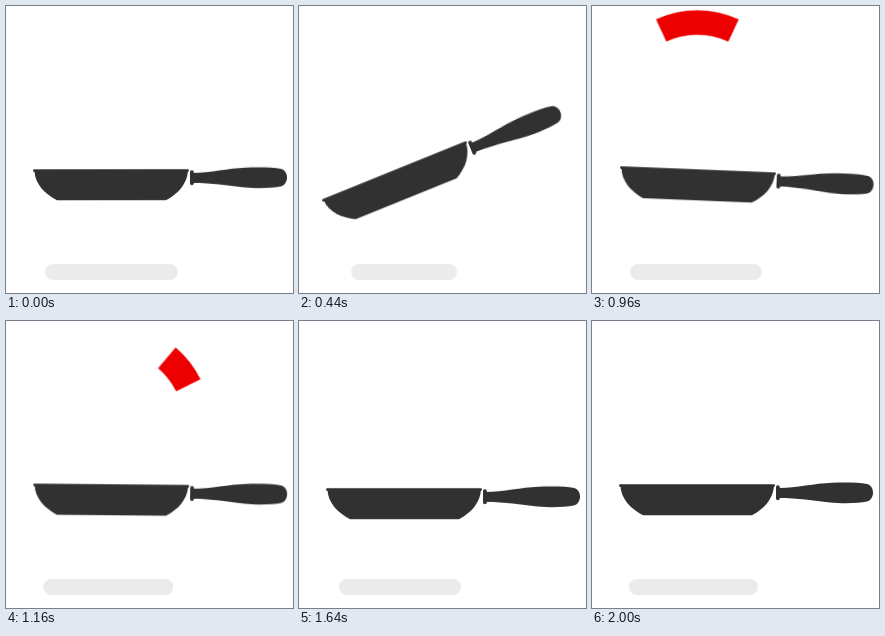
Write an HTML page that moves like this. It is 287x287 px and loops after 2.28 s.

```html
<!DOCTYPE html>
<html lang="en">
<head>
<meta charset="utf-8">
<title>Frying pan loader</title>
<style>
  html, body { margin: 0; width: 100%; height: 100%; overflow: hidden; background: #fff; }
  svg { display: block; width: 100%; height: 100%; }

  .pan, .toss, .shadow { animation: 2280ms linear infinite; }

  .pan {
    fill: #313131;
    transform-origin: 102.5px 189.3px;
    animation-name: swing;
  }
  .toss {
    fill: none;
    stroke: #ed0000;
    transform-origin: 105.3px 102.5px;
    animation-name: toss;
  }
  .shadow { fill: #ebebeb; animation-name: shadow; }

  /* tilt back, flick, settle, then dip under the landing */
  @keyframes swing {
    0%     { transform: translateY(0) rotate(0deg); }
    21.93% { transform: translateY(0) rotate(-25deg); }
    26.32% { transform: translateY(0) rotate(7deg); }
    48.25% { transform: translateY(0) rotate(.5deg); }
    51.75% { transform: translateY(0) rotate(.5deg); }
    55.26% { transform: translateY(6px) rotate(.4deg); }
    59.65% { transform: translateY(5.3px) rotate(.4deg); }
    71.93% { transform: translateY(3.9px) rotate(0deg); }
    87.72%, 100% { transform: translateY(0) rotate(0deg); }
  }

  /* rotation places the tail; the dash is the visible length in degrees */
  @keyframes toss {
    0%, 21.93% {
      transform: rotate(-232deg); stroke-dasharray: 0 360; stroke-width: 13px;
      animation-timing-function: ease-in;
    }
    26.32% { transform: rotate(-220deg); stroke-dasharray: 103 360; stroke-width: 15.5px; }
    48.25% {
      transform: rotate(-74.3deg); stroke-dasharray: 29.2 360; stroke-width: 28px;
      animation-timing-function: ease-in;
    }
    55.26%, 100% { transform: rotate(50deg); stroke-dasharray: 0 360; stroke-width: 24px; }
  }

  @keyframes shadow {
    0%     { x: 39px; width: 133px; }
    21.93% { x: 54px; width: 102px; }
    26.32% { x: 39px; width: 132px; }
    42.11% { x: 38px; width: 132px; }
    55.26%, 59.65% { x: 37px; width: 129px; }
    71.93% { x: 40px; width: 122px; }
    87.72%, 100% { x: 37px; width: 129px; }
  }
</style>
</head>
<body>
<svg viewBox="0 0 287 287">
  <rect class="shadow" x="39" y="258" width="133" height="16" rx="8"/>
  <circle class="toss" cx="105.3" cy="102.5" r="86" pathLength="360" stroke-dasharray="0 360"/>
  <g class="pan">
    <rect x="27" y="163.3" width="156" height="2.6" rx="1.3"/>
    <path d="M28.5 165C29 178 39 188 51 194.2H160C172 188 181 178 182 165Z"/>
    <rect x="184" y="164.2" width="3.8" height="15" rx="1.9"/>
    <path d="M187 167C205 167 222 162.4 240 161.8C254 161.2 267 161.6 275 163C283 165 283 178 275 180.6C266 182.4 250 182.6 238 181.4C221 179.6 206 177 187 177Z"/>
  </g>
</svg>
</body>
</html>
```
